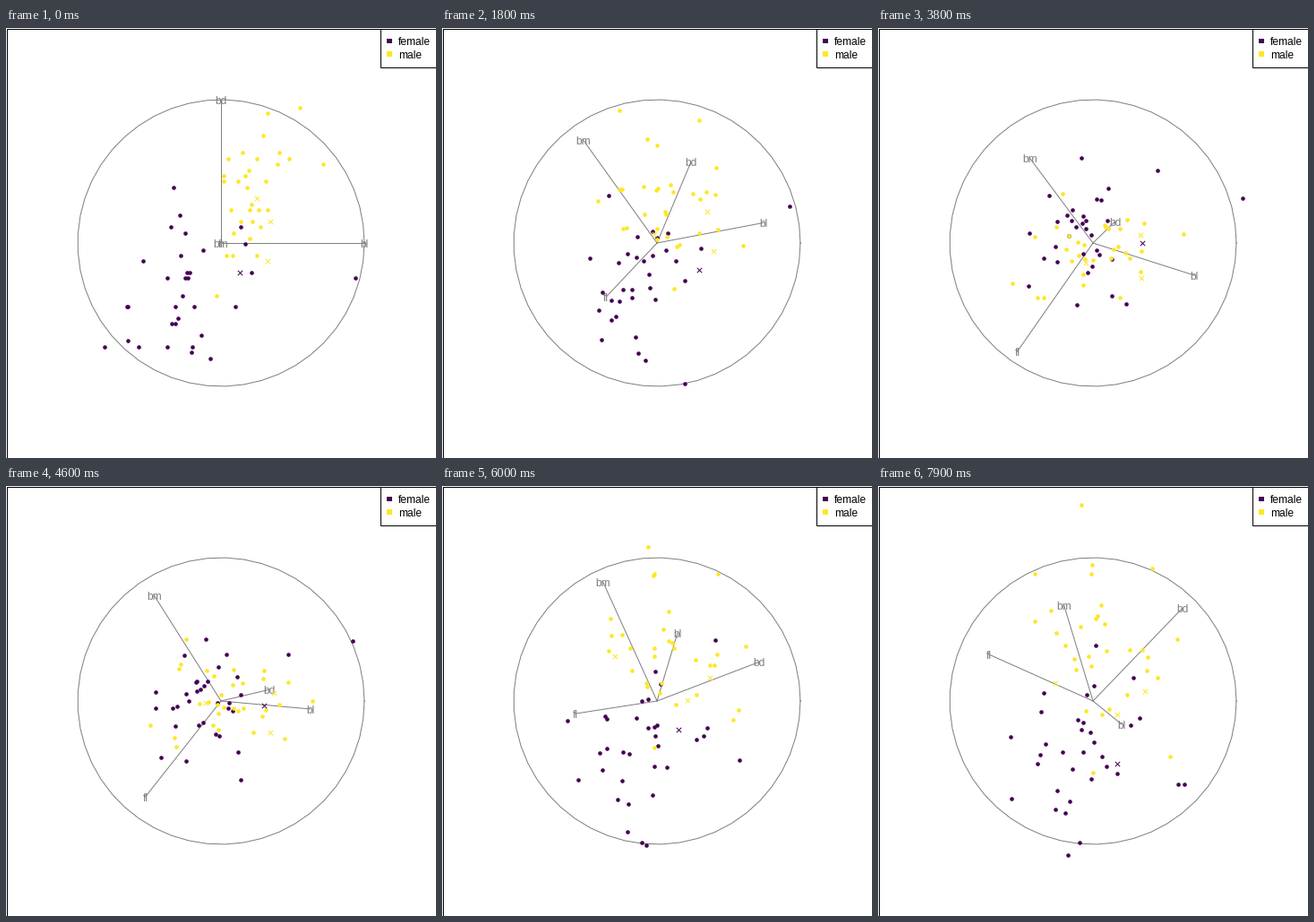
Animation of 480 by 480 pixels, one loop 8 s. Source, as a matplotlib script:

```python
import numpy as np
import matplotlib.pyplot as plt
from matplotlib.animation import FuncAnimation
from matplotlib.patches import Rectangle

SIZE, CENTER, RADIUS, SPREAD = 480, 240, 160, 280
DPI = 80
PX = 72 / DPI  # points per pixel
GREY, FEMALE, MALE = "#7f7f7f", "#440154", "#fde725"
FONT = dict(family="Liberation Sans", size=12 * PX)

# bill length, bill depth, flipper length, body mass
# the last row of females and last three of males are drawn as crosses
females = np.array([
    (46.5, 17.9, 192, 3500), (45.4, 18.7, 188, 3525), (45.2, 17.8, 198, 3950),
    (46.1, 18.2, 178, 3250), (46.0, 18.9, 195, 4150), (46.6, 17.8, 193, 3800),
    (47.0, 17.3, 185, 3700), (45.9, 17.1, 190, 3575), (58.0, 17.8, 181, 3700),
    (46.4, 18.6, 190, 3450), (42.4, 17.3, 181, 3600), (43.2, 16.6, 187, 2900),
    (46.7, 17.9, 195, 3300), (50.5, 18.4, 200, 3400), (46.4, 17.8, 191, 3700),
    (40.9, 16.6, 187, 3200), (42.5, 16.7, 187, 3350), (47.5, 16.8, 199, 3900),
    (47.6, 18.3, 195, 3850), (46.9, 16.6, 192, 2700), (46.2, 17.5, 187, 3650),
    (45.5, 17.0, 196, 3500), (50.9, 17.9, 196, 3675), (49.8, 17.3, 198, 3675),
    (48.1, 16.4, 199, 3325), (45.7, 17.3, 193, 3600), (42.5, 17.3, 187, 3350),
    (45.2, 16.6, 191, 3250), (45.6, 19.4, 194, 3525), (46.8, 16.5, 189, 3650),
    (45.7, 17.0, 195, 3650), (43.5, 18.1, 202, 3400), (50.2, 18.7, 198, 3775),
    (50.1, 17.9, 190, 3400)])
males = np.array([
    (50.0, 19.5, 196, 3900), (52.7, 19.8, 197, 3725), (51.3, 18.2, 197, 3750),
    (51.3, 19.9, 198, 3700), (51.7, 20.3, 194, 3775), (50.5, 19.6, 201, 4050),
    (50.3, 20.0, 197, 3300), (49.2, 18.2, 195, 4400), (48.5, 17.5, 191, 3400),
    (50.6, 19.4, 193, 3800), (52.0, 19.0, 197, 4150), (49.5, 19.0, 200, 3800),
    (52.8, 20.0, 205, 4550), (54.2, 20.8, 201, 4300), (51.0, 18.8, 203, 4100),
    (49.7, 18.6, 195, 3600), (52.0, 20.7, 210, 4800), (53.5, 19.9, 205, 4500),
    (49.0, 19.5, 210, 3950), (50.9, 19.1, 196, 3550), (50.8, 18.5, 201, 4450),
    (49.0, 19.6, 212, 4300), (51.5, 18.7, 187, 3250), (51.4, 19.0, 201, 3950),
    (50.7, 19.7, 203, 4050), (49.3, 19.9, 203, 4050), (50.2, 18.8, 202, 3800),
    (51.9, 19.5, 206, 3950), (55.8, 19.8, 207, 4000), (49.6, 18.2, 193, 3775),
    (50.8, 19.0, 210, 4100),
    (51.3, 19.2, 193, 3650), (52.0, 18.1, 201, 4050), (52.2, 18.8, 197, 3450)])

everyone = np.vstack([females, males])
mean, extent = everyone.mean(axis=0), np.ptp(everyone, axis=0)
females, males = ((g - mean) / extent * SPREAD for g in (females, males))


def basis(x, y):
    """Nearest orthonormal 4x2 frame to the given columns."""
    u, _, vt = np.linalg.svd(np.column_stack([x, y]), full_matrices=False)
    return u @ vt


def leg(a, start, b, end):
    """Geodesic through two frames, as a function of the step number."""
    u, cosines, vt = np.linalg.svd(start.T @ end)
    ga, gb = start @ u, end @ vt.T
    tau = np.arccos(np.clip(cosines, -1, 1 - 1e-12))

    def at(step):
        p = (step - a) / (b - a)
        g = (ga * np.sin((1 - p) * tau) + gb * np.sin(p * tau)) / np.sin(tau)
        return g @ u.T
    return at


leg1 = leg(0, np.eye(4, 2),
           8, basis((.966, .05, -.1, -.2375), (.05, .812, -.306, .5)))
leg3 = leg(27, basis((.331, .375, -.5875, -.6375), (.156, .606, -.306, .719)),
           38, basis((.709, .155, -.528, -.444), (-.225, .151, -.756, .594)))
leg2 = leg(14, leg1(13), 25, leg3(26))
leg4 = leg(41, leg3(40),
           53, basis((.356, .612, -.531, -.465), (.306, .131, -.397, .854)))
leg5 = leg(58, leg4(57),
           66, basis((.031, .6375, -.722, -.2625), (.331, .569, .2625, .706)))
leg6 = leg(73, leg5(72),
           79, basis((.2, .619, -.728, -.206), (-.1625, .65, .325, .669)))
starts = (0, 14, 26, 41, 58, 73)
legs = (leg1, leg2, leg3, leg4, leg5, leg6)


def to_stage(xy):
    return CENTER + xy * (1, -1)


fig = plt.figure(figsize=(SIZE / DPI, SIZE / DPI), dpi=DPI, facecolor="white")
ax = fig.add_axes([0, 0, 1, 1])
ax.set(xlim=(0, SIZE), ylim=(SIZE, 0))
ax.axis("off")


def box(x0, y0, x1, y1):
    ax.add_patch(Rectangle((x0, y0), x1 - x0, y1 - y0, fill=False,
                           ec="black", lw=PX, zorder=5))


box(.5, .5, 479.5, 479.5)
box(417.5, .5, 479.5, 43.5)
for name, color, y, base in (("female", FEMALE, 14.4, 19), ("male", MALE, 28.8, 34)):
    ax.add_patch(Rectangle((425.3, y - 2.7), 5.4, 5.4, fc=color, lw=0, zorder=5))
    ax.text(438, base, name, va="baseline", color="black", zorder=5, **FONT)

theta = np.linspace(0, 2 * np.pi, 50)
ax.plot(*to_stage(RADIUS * np.column_stack([np.cos(theta), np.sin(theta)])).T,
        color=GREY, lw=PX, zorder=1)
spokes = [ax.plot([], [], color=GREY, lw=PX, zorder=1)[0] for _ in range(4)]
labels = [ax.text(0, 0, s, ha="center", va="baseline", color=GREY, zorder=2, **FONT)
          for s in ("bl", "bd", "fl", "bm")]


def dots(data, color):
    art = ax.scatter([], [], s=(4.6 * PX) ** 2, color=color, lw=0, zorder=3)
    return art, data


def crosses(data, color):
    art = ax.scatter([], [], s=(5.4 * PX) ** 2, color=color, marker="x",
                     lw=PX, zorder=3)
    return art, data


clouds = [dots(females[:-1], FEMALE), dots(males[:-3], MALE),
          crosses(females[-1:], FEMALE), crosses(males[-3:], MALE)]


def update(i):
    frame = legs[np.searchsorted(starts, i, side="right") - 1](i)
    for spoke, label, (x, y) in zip(spokes, labels, to_stage(RADIUS * frame)):
        spoke.set_data([CENTER, x], [CENTER, y])
        label.set_position((x, y + 5))
    for art, data in clouds:
        art.set_offsets(to_stage(data @ frame))
    return [*spokes, *labels, *(art for art, _ in clouds)]


anim = FuncAnimation(fig, update, frames=80, interval=100,
                     repeat=True, repeat_delay=0, blit=False)
plt.show()
```
